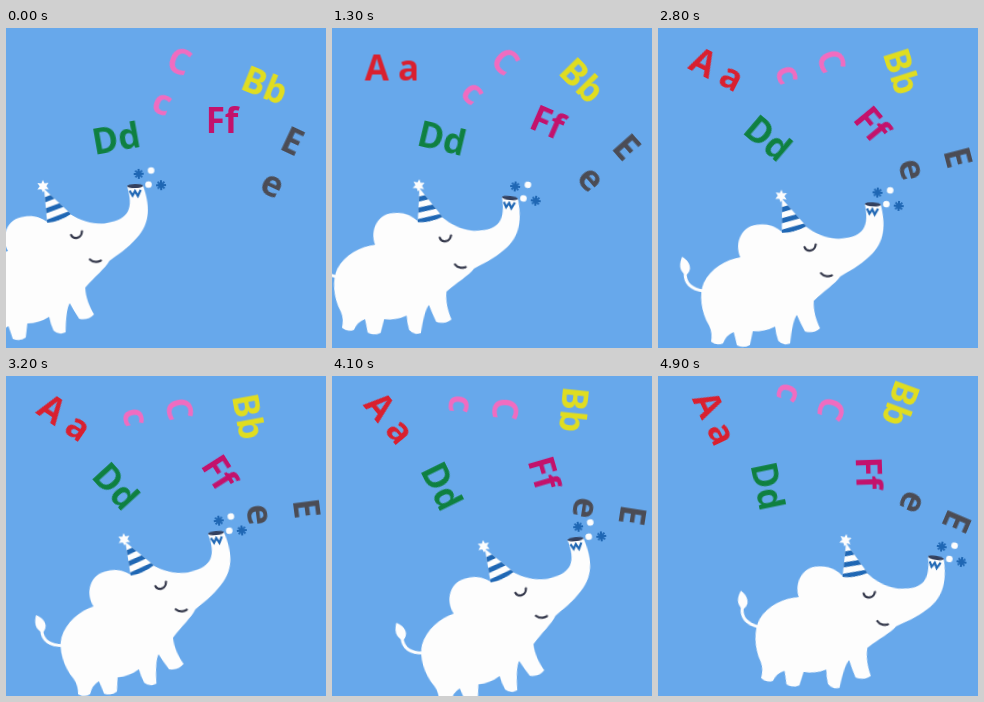
An HTML page that plays this animation: 320x320 px, repeating every 5000 ms.

```html
<!DOCTYPE html>
<html lang="en">
<head>
<meta charset="utf-8">
<title>Elephant and letters</title>
<style>
html, body { margin: 0; width: 100%; height: 100%; overflow: hidden; background: #67a8eb; }
svg { display: block; width: 100vw; height: 100vh; }
text { font: 700 35px "Open Sans", "Noto Sans", sans-serif; text-anchor: middle; }

.spin { animation: spin 5s linear infinite; }
.late { animation: appear 5s step-end infinite; }
.walk { animation: walk 5s linear infinite; }
.bob { animation: bob 5s cubic-bezier(.37, 0, .63, 1) infinite; }
.rock { transform-origin: 95px 235px; animation: rock 5s cubic-bezier(.37, 0, .63, 1) infinite; }

@keyframes spin {
  from { transform: rotate(var(--a)); }
  to { transform: rotate(calc(var(--a) + 90deg)); }
}
@keyframes appear {
  0% { opacity: 0; }
  12%, 100% { opacity: 1; }
}
@keyframes walk {
  0% { transform: translateX(-59.6px); }
  26% { transform: translateX(-20.4px); }
  42% { transform: translateX(0); }
  56% { transform: translateX(19.5px); }
  72% { transform: translateX(33.6px); }
  82% { transform: translateX(60.8px); }
  98% { transform: translateX(76.3px); }
  100% { transform: translateX(78px); }
}
@keyframes bob {
  0% { transform: translateY(-1px); }
  10% { transform: translateY(11px); }
  22% { transform: translateY(-4.5px); }
  33% { transform: translateY(1.5px); }
  45% { transform: translateY(-.5px); }
  60% { transform: translateY(10px); }
  70% { transform: translateY(-7px); }
  82% { transform: translateY(11px); }
  92% { transform: translateY(-1px); }
  100% { transform: translateY(4px); }
}
@keyframes rock {
  0% { transform: rotate(-1.8deg); }
  6% { transform: rotate(6deg); }
  16% { transform: rotate(-6deg); }
  27% { transform: rotate(6.4deg); }
  38% { transform: rotate(-2deg); }
  53% { transform: rotate(6deg); }
  63% { transform: rotate(-6deg); }
  73% { transform: rotate(9deg); }
  83% { transform: rotate(-6.5deg); }
  97% { transform: rotate(9.6deg); }
  100% { transform: rotate(8.5deg); }
}
</style>
</head>
<body>
<svg viewBox="0 0 320 320">
  <defs>
    <clipPath id="cone"><path d="M100 162 L102 196 Q115 195 126 188 Z"/></clipPath>
    <path id="burst" d="M-5 0H5M0-5V5M-3.4-3.4L3.4 3.4M-3.4 3.4L3.4-3.4"/>
  </defs>

  <g class="late" fill="#d9202f">
    <g transform="translate(56.5 38.5)"><g class="spin" style="--a:-23.4deg"><text x="3.5" y="13.5">A a</text></g></g>
  </g>
  <g fill="#e0dd20" transform="translate(266 34)"><g class="spin" style="--a:22deg"><text x="2" y="37">Bb</text></g></g>
  <g fill="#f06cc0" transform="translate(173.5 33)">
    <g class="spin" style="--a:20.5deg"><text y="12.5">C</text><text x="-1.5" y="56.5">c</text></g>
  </g>
  <g fill="#0f8041" transform="translate(110 110)"><g class="spin" style="--a:-10deg"><text y="13">Dd</text></g></g>
  <g fill="#4b4c55" transform="translate(276 135.5)">
    <g class="spin" style="--a:25deg"><text y="-12.5">E</text><text y="34.5">e</text></g>
  </g>
  <g fill="#c3126c" transform="translate(211 92)"><g class="spin" style="--a:0deg"><text x="5" y="13">Ff</text></g></g>

  <g class="walk"><g class="bob"><g class="rock">
    <g fill="#fdfdfd">
      <path d="M28 259 C16 258 8 253 8 242" fill="none" stroke="#fdfdfd" stroke-width="3"/>
      <path d="M4 226 C13 231 15 239 9 244 C2 241 1 234 4 226Z"/>
      <path d="M183 162 L199 162 C205 181 206 199 191 214 C182 224 170 231 163 236
        C158 244 148 251 138 262 C138 272 142 282 146 289 Q140 295 131 293 Q126 285 122 277
        Q118 283 117 306 Q110 309 105 304 Q102 297 101 290 Q91 296 79 296
        Q78 303 77 310 Q71 314 64 311 Q62 304 60 298 Q53 301 50 310 Q44 313 38 309
        Q39 300 35 293 C26 280 23 262 27 251 C33 236 48 226 62 223
        C55 209 61 190 80 189 C90 188 96 191 102 195 L125 188
        C137 196 151 200 162 198 C184 195 189 184 183 162Z"/>
    </g>

    <g clip-path="url(#cone)">
      <rect x="95" y="155" width="40" height="45" fill="#fdfdfd"/>
      <path d="M92 176 L120 166 M92 187 L125 176 M92 199 L132 185" stroke="#1f67b4" stroke-width="5"/>
    </g>
    <path d="M99 153l1.6 3.6 4-.6-2.3 3.3 2.4 3.3-4-.4-1.7 3.6-1.7-3.6-4 .4 2.4-3.3-2.3-3.3 4 .6Z" fill="#fdfdfd"/>

    <g fill="none" stroke="#33374a" stroke-width="2.2" stroke-linecap="round">
      <path d="M125.500 209 C128 214 136 213 136.500 205.500"/>
      <path d="M143.500 234 Q148 238.500 154.500 235.500"/>
    </g>

    <ellipse cx="191" cy="162" rx="8" ry="2" fill="#33405e"/>
    <path d="M185.500 166.500l2.700 5 2.600-4.500 2.700 5 3-6" fill="none" stroke="#1f67b4" stroke-width="2.200"/>

    <g stroke="#1f67b4" stroke-width="2">
      <use href="#burst" x="195" y="150"/>
      <use href="#burst" x="217" y="162"/>
    </g>
    <g fill="#fdfdfd">
      <circle cx="207.500" cy="147" r="3.300"/>
      <circle cx="204.500" cy="161" r="3.300"/>
    </g>
  </g></g></g>
</svg>
</body>
</html>
```
